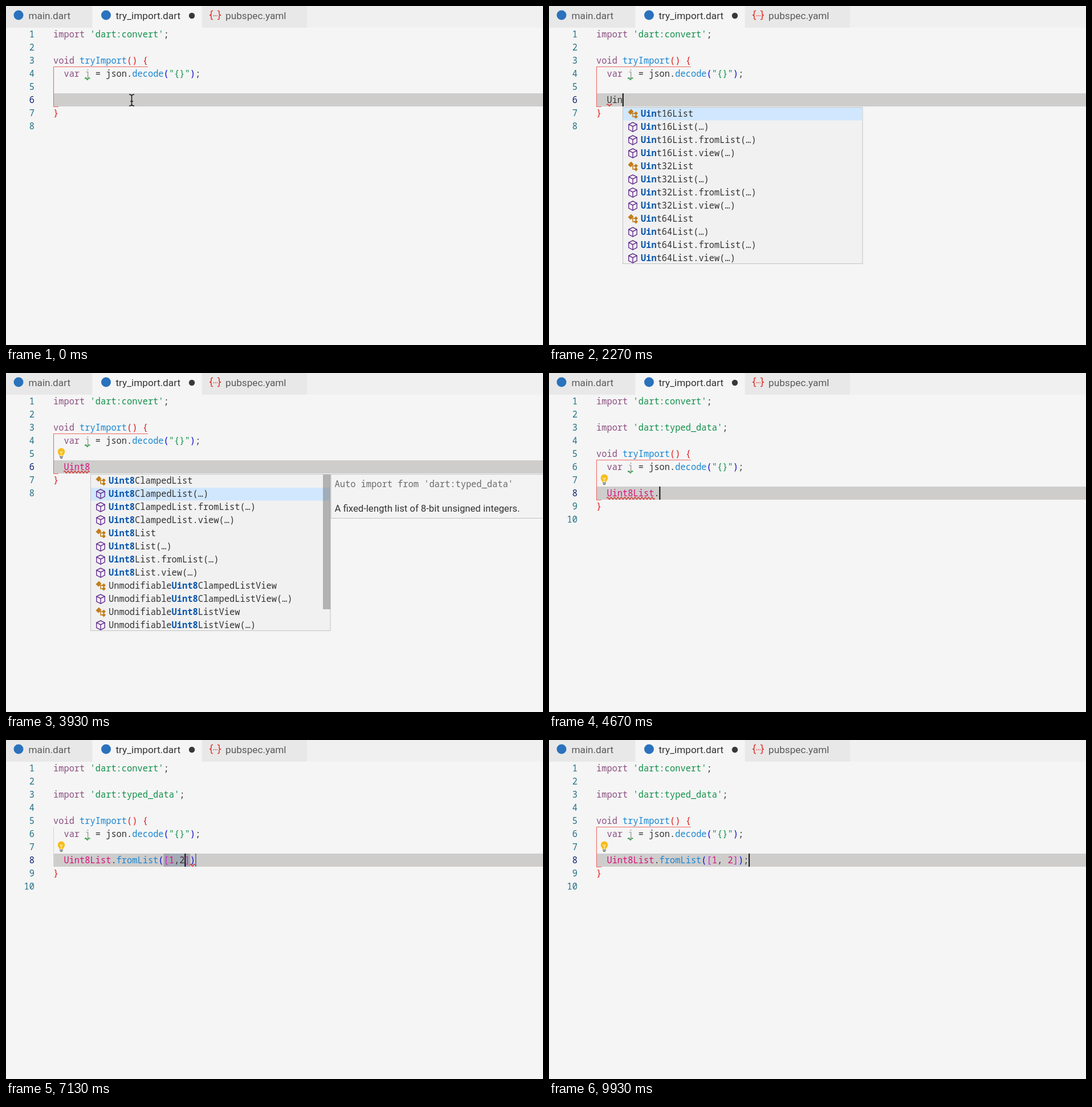
These frames come from a looping animation (942 by 594 pixels, 9990 ms). An HTML page:

```html
<!DOCTYPE html>
<html lang="en">
<head>
<meta charset="utf-8">
<title>Auto import while typing</title>
<style>
  html, body { margin: 0; width: 100%; height: 100%; overflow: hidden; background: #f5f5f5; }
  svg { display: block; width: 942px; height: 594px; }
  text { font: 15.37px "Noto Sans Mono", "DejaVu Sans Mono", monospace; fill: #333; white-space: pre; }
  .ui { font: 17.2px Roboto, sans-serif; fill: #5a5a5a; }
  .doc { font: 16.7px Roboto, sans-serif; }
  .sig { fill: #6a6a6a; }
  .num { fill: #237085; text-anchor: end; }
  .now { fill: #0b216f; }
  .k { fill: #8a4f80; }
  .f { fill: #1a86d2; }
  .s { fill: #12904a; }
  .c { fill: #d8107a; }
  .u { fill: #999; }
  .b0 { fill: #e01818; }
  .b1 { fill: #0a0ad0; }
  .b2 { fill: #e512dc; }
  .hit { fill: #0a56ac; font-weight: 700; }
  .line { fill: none; }
</style>
</head>
<body>
<svg viewBox="0 0 942 594">
  <defs>
    <g id="cube" fill="none" stroke="#652d90" stroke-width="1.4" stroke-linejoin="round">
      <path d="M0-8 7.2-4.6V4.4L0 8.2-7.2 4.4V-4.6ZM-7.2-4.6 0-1 7.2-4.6M0-1V8.2"/>
    </g>
    <g id="type" fill="#c27d1a">
      <path d="M-8.5-3 -3-8.5 1.5-4 -4 1.5ZM5.5-4.5 9-1 5.5 2.5 2-1ZM5.5 1.5 9 5 5.5 8.5 2 5Z"/>
      <path d="M-2-1H4M0-1V5H4" fill="none" stroke="#c27d1a" stroke-width="1.5"/>
    </g>
    <g id="bulb">
      <path d="M-3.4 5C-3.4 2.8-6.2 2-6.2-2.4A6.2 6.2 0 0 1 6.2-2.4C6.2 2 3.4 2.8 3.4 5Z" fill="#f7bd1c"/>
      <path d="M-2.4-2.5 0 0 2.4-2.5M0 0V4.5" fill="none" stroke="#fff3c8" stroke-width="1.2"/>
      <path d="M-3 6.7H3M-2 9.2H2" stroke="#666" stroke-width="1.4"/>
    </g>
  </defs>
  <rect width="942" height="594" fill="#f5f5f5"/>
  <rect width="942" height="38" fill="#f0f0f0"/>
  <path d="M0 0H151V38H0ZM344 0H528V38H344Z" fill="#e8e8e8"/>
  <path d="M152 0H343V38H152Z" fill="#f5f5f5"/>
  <circle cx="22" cy="16" r="8.5" fill="#2a72bd"/>
  <circle cx="175.5" cy="16" r="8.5" fill="#2a72bd"/>
  <text class="ui" x="39.5" y="23">main.dart</text>
  <text class="ui" x="192.5" y="23" style="fill:#333">try_import.dart</text>
  <circle cx="326" cy="17" r="5.2" fill="#383838"/>
  <g fill="none" stroke="#e23a34" stroke-width="1.6">
    <path d="M363 8.5H361.5Q360 8.5 360 10.5V13.5Q360 16 357 16Q360 16 360 18.5V21.5Q360 23.5 361.5 23.5H363"/>
    <path d="M371 8.5H372.5Q374 8.5 374 10.5V13.5Q374 16 377 16Q374 16 374 18.5V21.5Q374 23.5 372.5 23.5H371"/>
    <path d="M363.5 17H365M366.5 17H368M369.5 17H371"/>
  </g>
  <text class="ui" x="385" y="23">pubspec.yaml</text>
  <g id="editor"></g>
  <g id="mouse" display="none">
    <path id="beam" class="line" d="M-4.5-10Q0-10 0-7Q0-10 4.5-10M0-7V7M-4.5 10Q0 10 0 7Q0 10 4.5 10M-2.5 2H2.5" stroke="#222" stroke-width="1.7"/>
    <path id="arrow" d="M-5-9V6L-1.5 3 1 9 3.5 8 1 2H5.5Z" fill="#111" stroke="#fff"/>
  </g>
</svg>
<script>
const LOOP = 9990, ROW = 23, LEFT = 83, CELL = 9.222;
const $ = id => document.getElementById(id);
const colX = col => LEFT + col * CELL;
const rowY = n => 38 + ROW * (n - 1);

const family = type => ['', '(…)', '.fromList(…)', '.view(…)'].map(end => type + end);
const view = type => [type, type + '(…)'];
const typedDoc = bits => ["Auto import from 'dart:typed_data'", '',
  `A fixed-length list of ${bits}-bit unsigned integers.`];

const wide = {
  items: [16, 32, 64].flatMap(bits => family(`Uint${bits}List`)),
  doc: typedDoc(16)
};
const bytes = {
  items: [...family('Uint8ClampedList'), ...family('Uint8List'),
    ...view('UnmodifiableUint8ClampedListView'), ...view('UnmodifiableUint8ListView')],
  doc: typedDoc(8), scroll: true
};
const members = {
  items: ['fromList(…)', 'view(…)', 'bytesPerElement'],
  doc: ['(List&lt;int&gt; elements) → Uint8List', '',
    'Creates a Uint8List with the same length as', 'the elements list and copies the elements.']
};

const call = args => `  Uint8List.fromList(${args})`;
const start = { line: '  ', key: 250, waves: [], scope: true, plain: '', pick: 0 };
const steps = [
  [1890, { line: '  U' }],
  [2030, { line: '  Ui' }],
  [2110, { list: wide, word: 'Ui' }],
  [2170, { line: '  Uin', word: 'Uin', waves: [[2, 3]] }],
  [2450, { line: '  Uint', word: 'Uint' }],
  [2620, { doc: true }],
  [3080, { line: '  Uint8', word: 'Uint8', list: bytes, waves: [[2, 7]] }],
  [3280, { bulb: true }],
  [3900, { pick: 1 }],
  [3990, { pick: 2 }],
  [4080, { pick: 3 }],
  [4170, { pick: 4 }],
  [4330, { line: '  Uint8List', list: null, doc: false, pick: 0, imported: true, waves: [[2, 11]] }],
  [4560, { line: '  Uint8List.' }],
  [4960, { list: members, word: '' }],
  [5250, { doc: true }],
  [6050, { line: call('[elements]'), col: 30, list: null, doc: false, scope: false, plain: '[]',
    slot: [21, 31], sel: [22, 30], waves: [[22, 30], [31, 32]] }],
  [6560, { line: call('[1]'), col: 23, slot: [21, 24], sel: null, plain: '', waves: [[24, 25]] }],
  [6760, { line: call('[1,]'), col: 24, slot: [21, 25], waves: [[25, 26]] }],
  [7040, { line: call('[1,2]'), col: 25, slot: [21, 26], plain: '2', waves: [[26, 27]] }],
  [7300, { plain: '' }],
  [7900, { line: call('[1,2]'), col: 0, slot: null, scope: true, waves: [] }],
  [8280, { line: call('[1,2]') + ';' }],
  [8460, { line: call('[1, 2]') + ';' }]
];

function stateAt(t) {
  const s = { ...start };
  for (const [at, change] of steps) {
    if (at > t) break;
    Object.assign(s, change);
    if (change.line) s.key = at;
  }
  return s;
}

const kinds = { import: 'k', void: 'k', var: 'k', tryImport: 'f', decode: 'f', fromList: 'f',
  Uint8: 'c', Uint8List: 'c', j: 'u' };

const span = (kind, body) => kind ? `<tspan class="${kind}">${body}</tspan>` : body;

function highlight(line, depth, plain = '') {
  return line.replace(/'[^']*'|"[^"]*"|\w+|[()[\]{}]/g, part => {
    let kind = kinds[part];
    if (/^['"]/.test(part)) kind = 's';
    else if (/^\d/.test(part)) kind = 'c';
    else if (/[([{]/.test(part)) kind = 'b' + depth++;
    else if (/[)\]}]/.test(part)) kind = 'b' + --depth;
    return span(plain.includes(part) ? '' : kind, part);
  });
}

const text = (x, y, body, kind = '') => `<text class="${kind}" x="${x}" y="${y}">${body}</text>`;
const rect = (x, y, w, h, fill, stroke = 'none') =>
  `<rect x="${x}" y="${y}" width="${w}" height="${h}" fill="${fill}" stroke="${stroke}"/>`;
const path = (d, stroke, width = 1) =>
  `<path class="line" d="${d}" stroke="${stroke}" stroke-width="${width}"/>`;
const cells = (from, to, y, fill) => rect(colX(from), y, (to - from) * CELL, ROW, fill);

function wave(from, to, y, color) {
  let d = `M${colX(from)} ${y + 20.5}`;
  const n = Math.round((to - from) * CELL / 3);
  for (let i = 0; i < n; i++) d += `q1.5 ${i % 2 ? 3.6 : -3.6} 3 0`;
  return path(d, color, 1.3);
}

function popup(s, x, y) {
  const { items, doc, scroll } = s.list;
  const w = 420.5, edge = '#c3c3c3';
  let out = rect(x, y, w, items.length * ROW - 2, '#f1f1f1', edge);
  out += rect(x + 0.5, y + 0.5 + s.pick * ROW, w - 1, ROW - 0.5, '#d0e7fe');
  items.forEach((item, i) => {
    const mid = y + 11.5 + i * ROW;
    out += `<use href="#${/^U\w+$/.test(item) ? 'type' : 'cube'}" x="${x + 17.5}" y="${mid}"/>`;
    out += text(x + 31.5, mid + 5, s.word ? item.replace(s.word, span('hit', s.word)) : item);
  });
  if (scroll) out += rect(x + 407.5, y + 0.5, 13, 236, 'rgba(100,100,100,.45)');
  if (s.doc) {
    const docX = x + w + 1;
    out += rect(docX, y, 400, doc.length > 3 ? 101 : 77, '#f3f3f3', edge);
    doc.forEach((row, i) => {
      out += text(docX + 6.5, y + (i ? 20 + i * 22.5 : 22), row, i ? 'doc' : 'sig');
    });
  }
  return out;
}

function draw(s, caretOn) {
  const head = ["import 'dart:convert';", ''];
  if (s.imported) head.push("import 'dart:typed_data';", '');
  const lines = [...head, 'void tryImport() {', '  var j = json.decode("{}");', '', s.line, '}', ''];
  const fn = head.length + 1, now = fn + 3, y = rowY(now);
  const col = s.col || s.line.length, end = s.line.length;
  let out = '';

  if (!s.sel) out += rect(LEFT + 1, y, 942, ROW, '#cecdcc');
  if (s.slot) out += cells(...s.slot, y, s.sel ? '#c6c9ce' : '#a4abb6');
  if (s.sel) out += cells(...s.sel, y, '#a0a8b3');
  if (s.slot) {
    for (const c of [s.slot[0], s.slot[1] - 1])
      out += rect(colX(c) + 0.5, y + 0.5, CELL - 1, ROW - 1, 'rgba(150,150,150,.25)', '#a5a5a5');
    out += rect(colX(end), y, 2, ROW, '#6f7f99');
  }

  lines.forEach((line, i) => {
    const n = i + 1, base = rowY(n) + 17;
    out += text(50, base, n, n === now ? 'num now' : 'num');
    out += text(LEFT, base, highlight(line, n > fn ? 1 : 0, n === now ? s.plain : ''));
  });

  const body = rowY(fn + 1);
  out += s.scope
    ? path(`M${colX(18)} ${body - 0.5}H83.5V${y + ROW + 0.5}H92`, '#ef6a64', 1.1)
    : path(`M83.5 ${body}V${y + ROW}`, '#d3d3d3');
  if (s.sel) out += path(`M${colX(20)} ${y + 22.5}H${colX(end)}`, '#4040dd');
  out += wave(6, 7, body, '#1c9130');
  for (const [from, to] of s.waves) out += wave(from, to, y, '#d92020');
  if (s.bulb) out += `<use href="#bulb" x="97" y="${y - 13}"/>`;
  if (caretOn) out += rect(colX(col) - 0.3, y, 2, ROW, '#111');
  if (s.list) out += popup(s, Math.round(colX(col)) + 0.5, y + 24.5);
  return out;
}

const ease = p => p * p * (3 - 2 * p);
const glide = (t, from, to) => ease(Math.min(1, Math.max(0, (t - from) / (to - from))));
const show = (id, on) => $(id).setAttribute('display', on ? 'inline' : 'none');

function moveMouse(t) {
  const leaving = t > 9300;
  const p = leaving ? glide(t, 9330, 9700) : glide(t, 1000, 1450);
  const [x0, y0, x1, y1] = leaving ? [539, 225, 896, 12] : [220.5, 165, 539, 225];
  const y = y0 + (y1 - y0) * p;
  $('mouse').setAttribute('transform', `translate(${x0 + (x1 - x0) * p} ${y})`);
  show('mouse', t < 1890 || (leaving && t < 9760));
  show('beam', y >= 38);
  show('arrow', y < 38);
}

let shown = '';
const begun = performance.now();
function frame() {
  const t = (performance.now() - begun) % LOOP;
  const s = stateAt(t);
  const markup = draw(s, (t - s.key + 1000) % 1000 < 500);
  if (markup !== shown) $('editor').innerHTML = shown = markup;
  moveMouse(t);
  requestAnimationFrame(frame);
}
frame();
</script>
</body>
</html>
```
